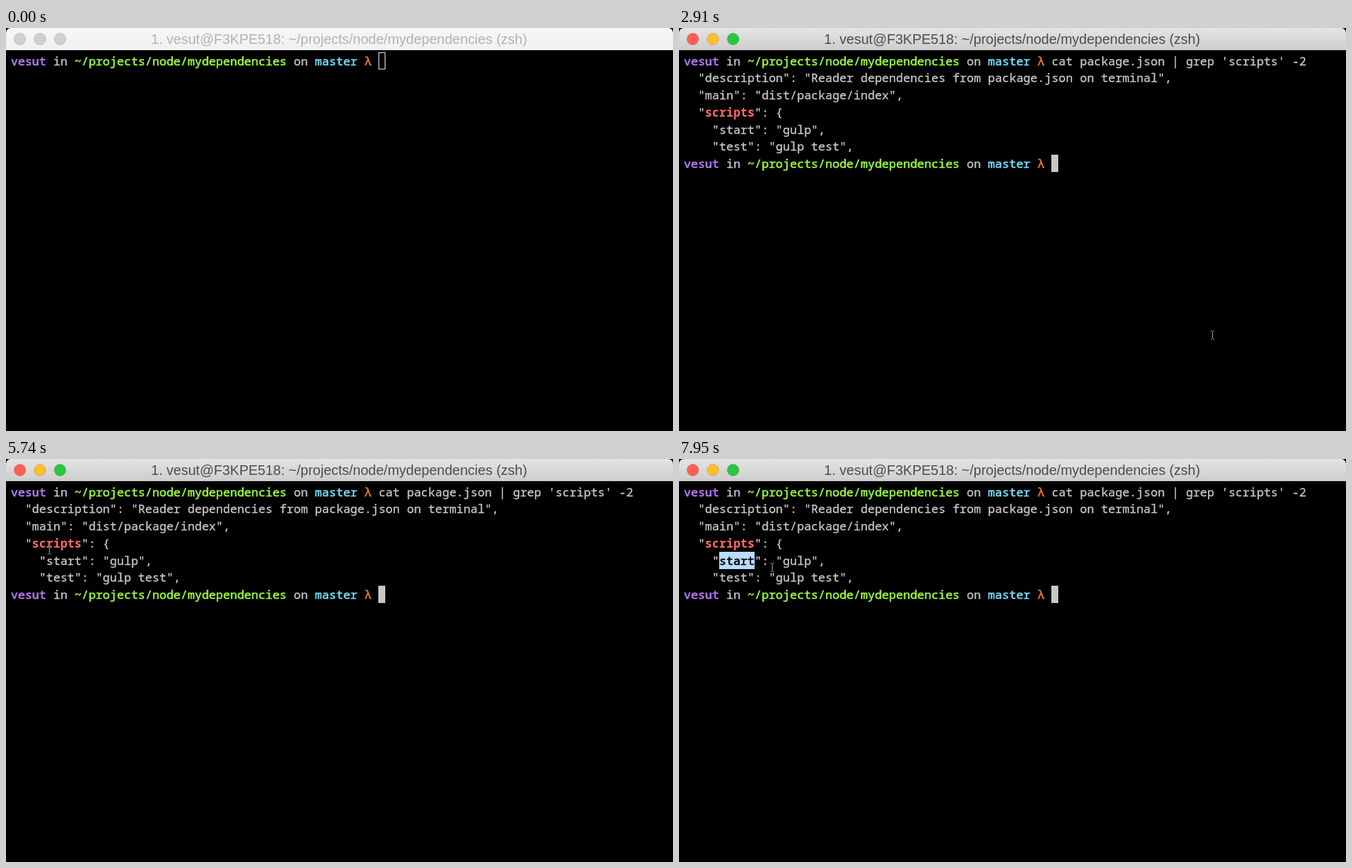
Animation, 962 px wide and 582 px high, one loop 7990 ms. Source, as an HTML page with a canvas:

```html
<!DOCTYPE html>
<html lang="en">
<head>
<meta charset="utf-8">
<title>Terminal</title>
<style>
html, body { margin: 0; width: 100%; height: 100%; overflow: hidden; background: #000; }
canvas { display: block; }
</style>
</head>
<body>
<canvas id="stage" width="962" height="582"></canvas>
<script>
const ctx = document.getElementById('stage').getContext('2d');
const LOOP = 7990, LEFT = 7, TOP = 35, CELL = 10.2, ROW = 24.75;
const FOCUS = 160, COMMAND = 1270, ENTER = 2290;
const GREY = '#c7c7c7';
const MONO = '17px "Noto Sans Mono", "DejaVu Sans Mono", monospace';

const prompt = [
  ['vesut', '#bd7bff'], [' in '], ['~/projects/node/mydependencies', '#9af83c'],
  [' on '], ['master', '#74dcf6'], [' '], ['λ', '#e87a2c'], [' ']
];
const promptCols = prompt.reduce((n, [text]) => n + text.length, 0);
const command = "cat package.json | grep 'scripts' -2";
const output = [
  [['  "description": "Reader dependencies from package.json on terminal",']],
  [['  "main": "dist/package/index",']],
  [['  "'], ['scripts', '#ff6a66', true], ['": {']],
  [['    "start": "gulp",']],
  [['    "test": "gulp test",']]
];

// Pointer path: time, x, y
const path = [
  [3400, 769, 443], [3660, 440, 232], [3850, 440, 232], [4240, 270, 130],
  [4620, 165, 77], [4670, 56, 145], [4910, 57, 144], [5180, 106, 146],
  [5450, 70, 134], [5580, 70, 134], [6040, 48, 126], [6270, 48, 126],
  [6370, 108, 130], [6680, 108, 131], [7030, 60, 142], [7080, 58, 143],
  [7480, 110, 143], [7720, 108, 136], [7850, 108, 136], [7900, 133, 158],
  [7950, 134, 156]
];
// Text selections dragged with the pointer
const drags = [
  { from: 6270, to: 6700, row: 3, start: 4, end: 10, text: 'cripts', bold: true },
  { from: 7080, to: LOOP, row: 4, start: 5, end: 10, text: 'start' }
];

const colX = col => LEFT + col * CELL;
const rowY = row => TOP + row * ROW;

function pointerAt(t) {
  const i = path.findIndex(p => p[0] > t);
  if (i === 0) return path[0].slice(1);
  if (i < 0) return path[path.length - 1].slice(1);
  const [a, b] = [path[i - 1], path[i]];
  const k = (t - a[0]) / (b[0] - a[0]);
  return [a[1] + (b[1] - a[1]) * k, a[2] + (b[2] - a[2]) * k];
}

// A thin outline gives the glyphs their medium weight
function drawText(text, row, col, color = GREY, bold = false) {
  const x = colX(col), y = Math.round(rowY(row) + 18.5);
  ctx.font = (bold ? 'bold ' : '') + MONO;
  ctx.fillStyle = ctx.strokeStyle = color;
  ctx.lineWidth = color === GREY ? .35 : .6;
  ctx.lineJoin = 'round';
  ctx.fillText(text, x, y);
  if (!bold) ctx.strokeText(text, x, y);
}

function drawLine(parts, row) {
  let col = 0;
  for (const [text, color, bold] of parts) {
    drawText(text, row, col, color, bold);
    col += text.length;
  }
}

function drawBar(focused) {
  const fill = ctx.createLinearGradient(0, 0, 0, 32);
  fill.addColorStop(0, focused ? '#e4e4e4' : '#f6f6f6');
  fill.addColorStop(1, focused ? '#cdcdcd' : '#f1f1f1');
  ctx.fillStyle = fill;
  ctx.beginPath();
  ctx.roundRect(0, 0, 962, 32, [7, 7, 0, 0]);
  ctx.fill();

  ctx.strokeStyle = 'rgba(0, 0, 0, .12)';
  ctx.lineWidth = 1;
  ['#ff5f57', '#fdbd2f', '#29c640'].forEach((color, i) => {
    ctx.fillStyle = focused ? color : '#d0d0d0';
    ctx.beginPath();
    ctx.arc(20 + i * 29, 16, 8.5, 0, 7);
    ctx.fill();
    ctx.stroke();
  });

  ctx.font = '20px "Liberation Sans", Arial, sans-serif';
  ctx.fillStyle = focused ? '#4c4c4c' : '#b2b2b2';
  ctx.textAlign = 'center';
  ctx.fillText('1. vesut@F3KPE518: ~/projects/node/mydependencies (zsh)', 480.5, 23);
  ctx.textAlign = 'left';
}

function drawCursor(row, col, focused) {
  const x = Math.round(colX(col)), y = Math.floor(rowY(row));
  ctx.fillStyle = ctx.strokeStyle = GREY;
  ctx.lineWidth = 1.3;
  if (focused) ctx.fillRect(x, y, 10, 25);
  else ctx.strokeRect(x + .7, y + .7, 9, 23.6);
}

function drawSelection(t, x) {
  const drag = drags.find(d => t >= d.from && t < d.to);
  if (!drag) return;
  const end = Math.min(drag.end, Math.round((x - LEFT) / CELL));
  const size = end - drag.start;
  if (size <= 0) return;
  const left = Math.round(colX(drag.start));
  ctx.fillStyle = '#b9dcff';
  ctx.fillRect(left, Math.round(rowY(drag.row)), Math.round(colX(end)) - left, 25);
  drawText(drag.text.slice(0, size), drag.row, drag.start, '#000', drag.bold);
}

function drawPointer(x, y) {
  ctx.save();
  ctx.translate(Math.round(x) + .5, Math.round(y) + .5);
  ctx.globalCompositeOperation = 'difference';
  ctx.strokeStyle = '#b0b0a8';
  ctx.lineWidth = 1;
  ctx.beginPath();
  ctx.moveTo(-2.5, -6); ctx.quadraticCurveTo(0, -6, 0, -4);
  ctx.quadraticCurveTo(0, -6, 2.5, -6);
  ctx.moveTo(0, -4); ctx.lineTo(0, 4);
  ctx.moveTo(-2.5, 6); ctx.quadraticCurveTo(0, 6, 0, 4);
  ctx.quadraticCurveTo(0, 6, 2.5, 6);
  ctx.stroke();
  ctx.restore();
}

function draw(now) {
  const t = now % LOOP, focused = t >= FOCUS;
  const typed = t >= COMMAND, done = t >= ENTER;
  const [x, y] = pointerAt(t);

  ctx.fillStyle = '#000';
  ctx.fillRect(0, 0, 962, 582);
  drawBar(focused);
  drawLine(prompt, 0);
  if (typed) drawText(command, 0, promptCols);
  if (done) {
    output.forEach((line, i) => drawLine(line, i + 1));
    drawLine(prompt, 6);
    drawSelection(t, x);
  }
  drawCursor(done ? 6 : 0, promptCols + (typed && !done ? command.length : 0), focused);
  if (focused) drawPointer(x, y);
}

const began = performance.now();
function tick() {
  draw(performance.now() - began);
  requestAnimationFrame(tick);
}
tick();
</script>
</body>
</html>
```
